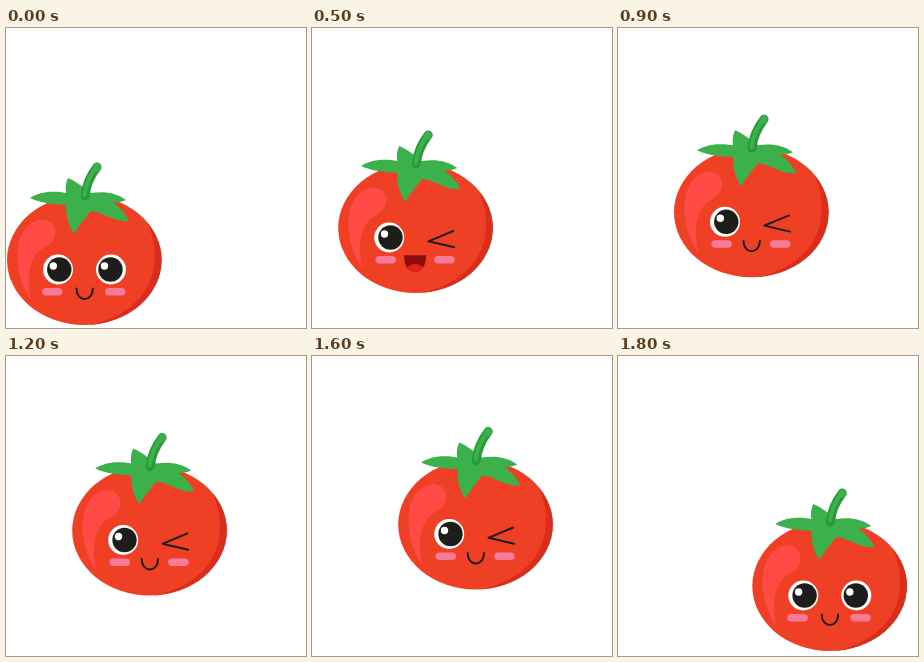
Recreate the animation shown at these times as an HTML page. Size 300 px wide and 300 px high, loop 1.9 s.

```html
<!DOCTYPE html>
<html lang="en">
<head>
<meta charset="utf-8">
<title>Jumping tomato</title>
<style>
  html, body { margin: 0; width: 100%; height: 100%; overflow: hidden; background: #fff; }
  svg { display: block; width: 100%; height: 100%; }
</style>
</head>
<body>
<svg viewBox="0 0 300 300">
  <defs>
    <clipPath id="bodyClip"><ellipse cx="78.3" cy="232" rx="77.3" ry="65"/></clipPath>
    <clipPath id="mouthClip"><path d="M66.8 259.3H89C89 270 84 276 78 276C71 276 66.8 270 66.8 259.3Z"/></clipPath>
    <g id="eye">
      <circle r="15" fill="#fff"/>
    </g>
  </defs>
  <g id="tomato">
    <g clip-path="url(#bodyClip)">
      <rect y="160" width="160" height="140" fill="#ef4026"/>
      <path d="M139 190C152 214 152 243 139 263C128 280 108 292 80 298H160V190Z" fill="#dc2c1c"/>
    </g>
    <path d="M25 272C8 250 5 205 27 194C40 187 51 196 49 207C46 220 36 217 29 228C21 240 22 256 25 272Z" fill="#ff4a45"/>
    <path d="M24 170C35 163 49 163 60 165C59 159 60 154 62 150C67 152 73 156 78 160L85 165C98 163 111 165 120 172C116 174 111 174.500 107 174.500C114 179 120 186 123 193C109 195 98 184 85 183C79 190 73 198 68 206C62 197 60 187 60 177C47 176 34 175 24 170Z" fill="#3bb04b"/>
    <g fill="none" stroke-linecap="round">
      <path d="M79 168C80 158 84 148 91 139" stroke="#279a3c" stroke-width="9"/>
      <path d="M78.500 167C79.500 158 83.500 148 90.500 138.500" stroke="#3bb04b" stroke-width="4"/>
      <path d="M91 139L90 140.500" stroke="#3bb04b" stroke-width="7"/>
    </g>
    <g fill="#f77a98">
      <rect id="cheekL" y="260" width="20.500" height="7.500" rx="4"/>
      <rect id="cheekR" y="260" width="20.500" height="7.500" rx="4"/>
    </g>
    <g>
      <use href="#eye" x="52" y="241.500"/>
      <circle cx="53.300" cy="241.500" r="12.200" fill="#1d1d1b"/>
      <circle cx="47.300" cy="238" r="3.700" fill="#fff"/>
    </g>
    <g id="openEye">
      <use href="#eye" x="105" y="241.500"/>
      <circle cx="104.500" cy="241.500" r="12.200" fill="#1d1d1b"/>
      <circle cx="98.500" cy="238" r="3.700" fill="#fff"/>
    </g>
    <g fill="none" stroke="#1d1d1b" stroke-width="1.900" stroke-linecap="round" stroke-linejoin="round">
      <path id="wink" d="M116 235L91.200 245.300L117 251.300"/>
      <path id="smile" d="M70.500 260.500C70.500 274.500 86.800 274.500 86.800 260.500"/>
    </g>
    <g id="laugh" clip-path="url(#mouthClip)">
      <rect x="66" y="259" width="24" height="18" fill="#8c0d09"/>
      <ellipse cx="78" cy="275" rx="9" ry="7" fill="#e0241c"/>
    </g>
  </g>
</svg>
<script>
  const LOOP = 1900;

  // Held poses of the hop: start time, x, y
  const hop = [
    [0, 0, 0], [100, 1, -1.5], [300, 9.3, -14], [400, 17, -23], [500, 25.2, -32],
    [700, 30.3, -40], [800, 43, -44], [900, 55, -47.7], [1100, 60, -52.5],
    [1200, 65.2, -57.5], [1400, 70, -67], [1500, 75, -77], [1600, 85.2, -63.5],
    [1700, 109, -35], [1800, 133.3, -2]
  ];

  const el = id => document.getElementById(id);
  const show = (id, on) => el(id).setAttribute("display", on ? "inline" : "none");

  function draw(ms) {
    const t = ms % LOOP;
    const [, x, y] = hop.findLast(p => p[0] <= t);
    const winking = t >= 300 && t < 1800;
    const laughing = t >= 300 && t < 900;

    el("tomato").setAttribute("transform", `translate(${x} ${y})`);
    show("openEye", !winking);
    show("wink", winking);
    show("laugh", laughing);
    show("smile", !laughing);
    el("cheekL").setAttribute("x", winking ? 38.3 : 36);
    el("cheekR").setAttribute("x", winking ? 97 : 99);
  }

  const start = performance.now();
  function tick() {
    draw(performance.now() - start);
    requestAnimationFrame(tick);
  }
  draw(0);
  requestAnimationFrame(tick);
</script>
</body>
</html>
```
